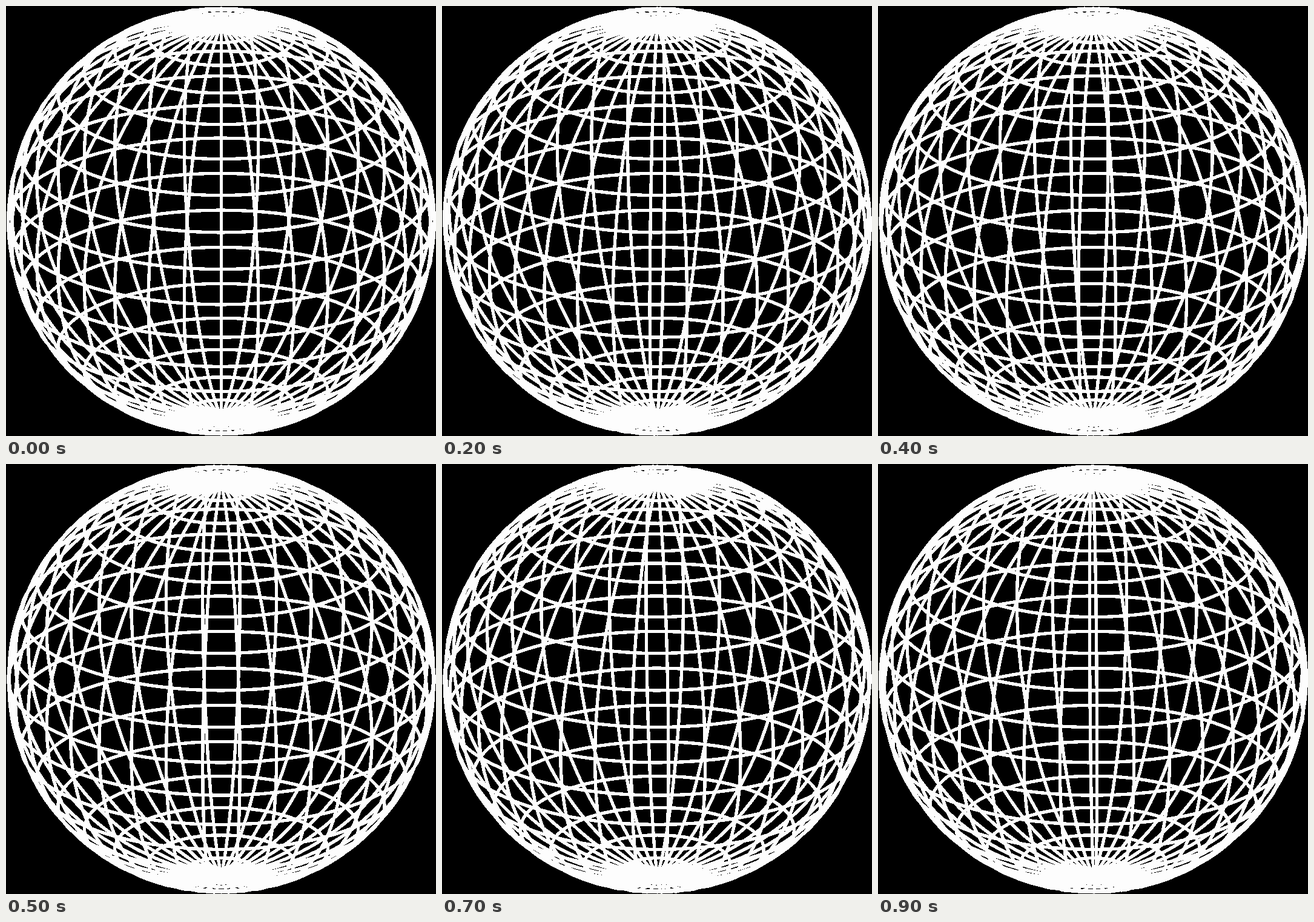
These frames come from a looping animation (710x710 px, 1000 ms). An HTML page:

```html
<!DOCTYPE html>
<html lang="en">
<head>
<meta charset="utf-8">
<title>Rotating wire sphere</title>
<style>
  html, body { margin: 0; width: 100%; height: 100%; overflow: hidden; background: #000; }
  svg { display: block; width: 100%; height: 100%; }
  ellipse { fill: none; stroke: #fdfdfd; stroke-width: 5.4; shape-rendering: crispEdges; }
</style>
</head>
<body>
<svg id="stage" viewBox="0 0 710 710"></svg>
<script>
const RAD = Math.PI / 180;
const CENTER = 355.5, RADIUS = 351.8;
const TILT = 23 * RAD, STEP = 10;
const LOOP = 1000, HOLD = 100;
const stage = document.getElementById('stage');

function addEllipse(cy, rx, ry) {
  const el = document.createElementNS('http://www.w3.org/2000/svg', 'ellipse');
  const attrs = { cx: CENTER, cy, rx, ry };
  for (const key in attrs) el.setAttribute(key, attrs[key]);
  stage.appendChild(el);
  return el;
}

// Parallels look the same at every rotation.
for (let lat = -80; lat <= 80; lat += STEP) {
  const r = RADIUS * Math.cos(lat * RAD);
  const cy = CENTER - RADIUS * Math.sin(lat * RAD) * Math.cos(TILT);
  addEllipse(cy, r, r * Math.sin(TILT));
}

// Each great circle carries two opposite meridians.
const meridians = [];
for (let lon = 0; lon < 180; lon += STEP) {
  meridians.push({ lon, el: addEllipse(CENTER, 1, RADIUS) });
}

function draw(time) {
  const turn = Math.floor((time % LOOP) / HOLD);
  for (const { lon, el } of meridians) {
    const a = (lon - turn) * RAD;
    const rx = Math.max(0.1, RADIUS * Math.abs(Math.sin(a)) * Math.cos(TILT));
    const angle = Math.atan2(-Math.sin(a) * Math.sin(TILT), Math.cos(a)) / RAD;
    el.setAttribute('rx', rx);
    el.setAttribute('transform', `rotate(${angle} ${CENTER} ${CENTER})`);
  }
}

const start = performance.now();
function tick() {
  draw(performance.now() - start);
  requestAnimationFrame(tick);
}
tick();
</script>
</body>
</html>
```
